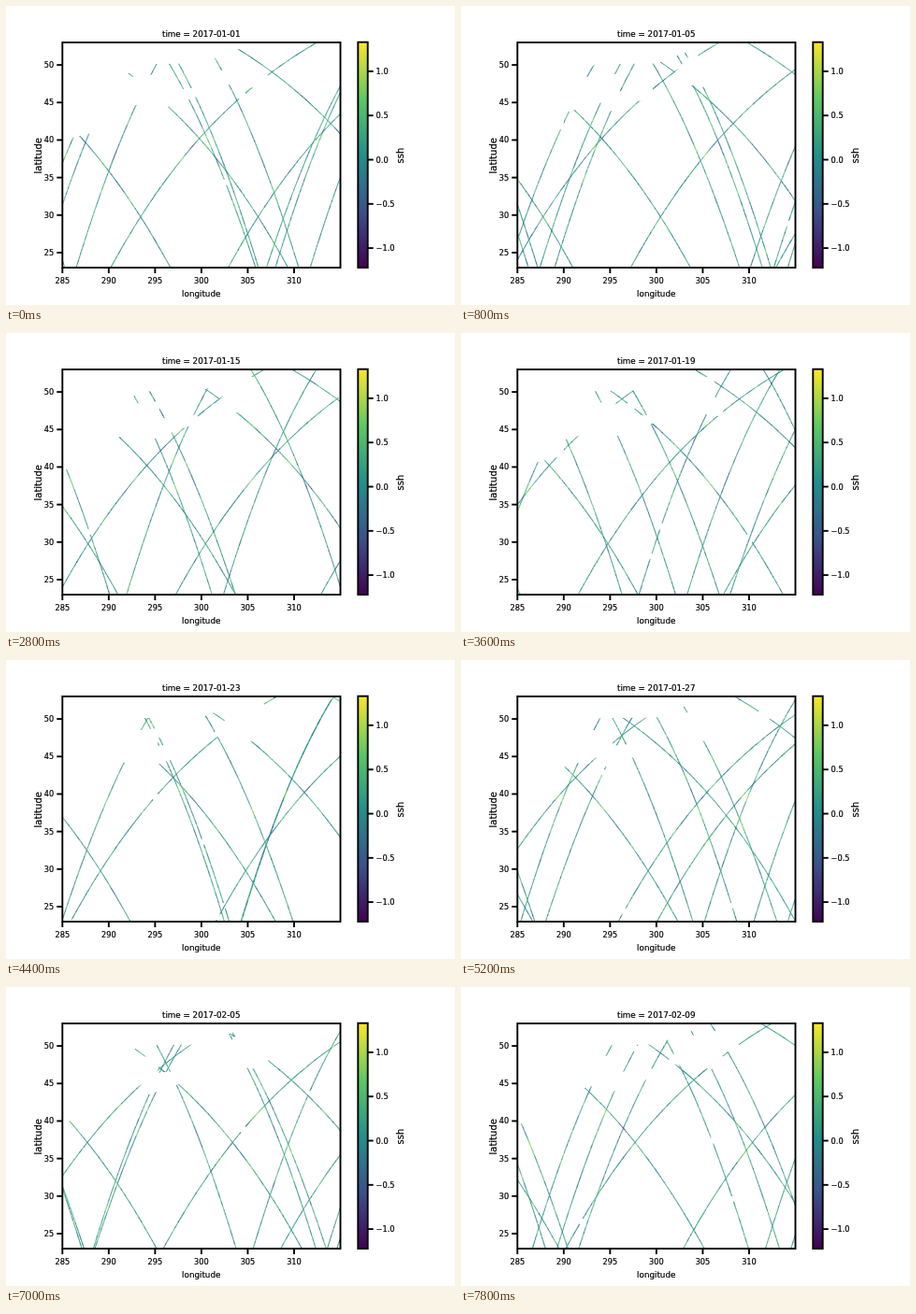
An HTML page with a canvas for the animation above (8 s loop, 480 by 320 pixels).

```html
<!DOCTYPE html>
<html lang="en">
<head>
<meta charset="utf-8">
<title>Sea surface height along satellite tracks</title>
<style>
  html, body { margin: 0; width: 100%; height: 100%; overflow: hidden; background: #fff; }
  canvas, svg { position: absolute; left: 0; top: 0; width: 480px; height: 320px; }
  text { font-family: "DejaVu Sans", sans-serif; fill: #000; stroke: #000; stroke-width: .2px; }
</style>
</head>
<body>
<canvas id="plot" width="480" height="320"></canvas>
<svg id="labels" viewBox="0 0 480 320"></svg>
<script>
const ctx = document.getElementById('plot').getContext('2d');
const svg = document.getElementById('labels');
const DAYS = 40, STEP = 200, RAD = Math.PI / 180;
const BOX = { l: 60.3, r: 357.5, t: 39, b: 280 };
const BAR = { l: 376.3, r: 386.7, t: 38.7, b: 280 };
const px = lon => BOX.l + (lon - 285) * 9.907;
const py = lat => BOX.b - (lat - 23) * 8.033;
const barY = v => 164.5 - v * 94.6;
const mod = (a, n) => ((a % n) + n) % n;
const hash = (a, b, c) => mod(Math.sin(a * 12.99 + b * 78.23 + c * 37.72) * 43758.55, 1);

// Height colours, evenly spaced from low to high
const RAMP = ['#440154', '#3b528b', '#21918c', '#5ec962', '#fde725'];
const channel = (hex, i) => parseInt(hex.slice(1 + 2 * i, 3 + 2 * i), 16);
function colour(v) {
  const k = Math.min(.999, Math.max(0, (BAR.b - barY(v)) / (BAR.b - BAR.t))) * (RAMP.length - 1);
  const i = Math.floor(k);
  const mix = c => channel(RAMP[i], c) * (1 - k + i) + channel(RAMP[i + 1], c) * (k - i);
  return `rgb(${[0, 1, 2].map(c => Math.round(mix(c)))})`;
}

// Rough coasts as lon, lat pairs: the mainland with its gulf, and the island
const COASTS = [
  [284,38, 286,40.3, 290,41.5, 290,43.6, 294,45, 294.3,43.5, 300,46, 299.5,47, 295.2,46.4,
   295.7,48.8, 291.5,48.3, 293.4,50.1, 300,50.2, 304.2,52.2, 304.4,54, 284,54],
  [301,47.7, 307.2,46.7, 307.2,48.6, 303.8,51.5]
];

// Sun-synchronous orbits: lon at 23N on day 0 for tracks leaning right and left,
// and degrees between passes
const POLAR = [
  { incl: 99.34, right: 307.02, left: 305.86, gap: 26.1253, outages: [14, 22] },
  { incl: 98.65, right: 311.74, left: 310.5, gap: 25.2468, outages: [] },
  { incl: 98.54, right: 307.98, left: 306.15, gap: 25.1545, outages: [] }
];
// Inclined orbits: day and lon of one northbound pass at 23N
const INCLINED = [{ t: 26.052, lon: 280.21 }, { t: 14.141, lon: 284.54 }];
const REV = 9.9156 / 127, REV_GAP = 3600 / 127;

// Longitude gained since the equator, on a flattened earth
function reach(incl, gap, lat) {
  const centric = Math.atan(.99331 * Math.tan(lat * RAD));
  const s = Math.sin(centric) / Math.sin(incl * RAD), u = Math.asin(s);
  return Math.atan2(Math.cos(incl * RAD) * s, Math.cos(u)) / RAD - gap / 360 * u / RAD;
}

function track(day, incl, gap, lon23, dir) {
  const start = reach(incl, gap, 23), d = .25, seed = lon23 + dir * 7;
  const at = lat => lon23 + dir * (reach(incl, gap, lat) - start);
  for (let lat = 22.75; lat < 53.25; lat += d) {
    const lon = at(lat), next = at(lat + d);
    if (Math.max(lon, next) < 284.8 || Math.min(lon, next) > 315.2) continue;
    if (hash(day, seed, Math.floor(lat * 1.3)) < .008) continue;
    const swell = Math.sin(lon * 1.1 + lat * .8) * Math.sin(lat * .9 - lon * .5 + day * .05);
    const stream = Math.exp(-(((lat - 38.5) / 4) ** 2));
    const noise = hash(day + 3, seed, lat) - .5;
    ctx.strokeStyle = colour(.12 + swell * (.2 + .3 * stream) + noise * .8);
    ctx.globalAlpha = .7 + .3 * hash(seed, lat, 1);
    line(px(lon), py(lat), px(next), py(lat + d));
  }
  ctx.globalAlpha = 1;
}

function polarTracks(day) {
  for (const s of POLAR) for (const [base, dir] of [[s.right, -1], [s.left, 1]]) {
    const drift = 360 - 14 * s.gap;
    for (let lon = 268 + mod(base + drift * day - 268, s.gap); lon < 330; lon += s.gap) {
      const lost = dir < 0 && lon > 300 && s.outages.includes(day);
      if (!lost) track(day, s.incl, s.gap, lon, dir);
    }
  }
}

function inclinedTracks(day) {
  for (const s of INCLINED) for (const [dt, dLon, dir] of [[0, 0, 1], [.028, 148.19, -1]]) {
    const t0 = s.t + dt;
    for (let n = Math.ceil((day - t0) / REV); t0 + n * REV < day + 1; n++) {
      const lon = mod(s.lon + dLon - n * REV_GAP, 360);
      if (lon > 255 && lon < 340) track(day, 66.04, REV_GAP, lon, dir);
    }
  }
}

function fillArea(points) {
  ctx.beginPath();
  for (let i = 0; i < points.length; i += 2) ctx.lineTo(px(points[i]), py(points[i + 1]));
  ctx.fill();
}

// Land and the slowly spreading sea ice carry no data
function hideLand(day) {
  const edge = 304 + day * .125;
  ctx.fillStyle = '#fff';
  COASTS.forEach(fillArea);
  fillArea([304, 49.2, edge, 49.2, edge, 52, 304, 52]);
}

function line(x1, y1, x2, y2) {
  ctx.beginPath();
  ctx.moveTo(x1, y1);
  ctx.lineTo(x2, y2);
  ctx.stroke();
}

const rectOf = b => [b.l, b.t, b.r - b.l, b.b - b.t];

function axes() {
  const g = ctx.createLinearGradient(0, BAR.b, 0, BAR.t);
  RAMP.forEach((c, i) => g.addColorStop(i / (RAMP.length - 1), c));
  ctx.fillStyle = g;
  ctx.fillRect(...rectOf(BAR));

  ctx.strokeStyle = '#000';
  ctx.lineWidth = 1.9;
  ctx.strokeRect(...rectOf(BOX));
  ctx.strokeRect(...rectOf(BAR));
  for (let lon = 285; lon < 315; lon += 5) line(px(lon), BOX.b, px(lon), BOX.b + 6);
  for (let lat = 25; lat <= 50; lat += 5) line(BOX.l - 6, py(lat), BOX.l, py(lat));
  for (let v = -1; v <= 1; v += .5) line(BAR.r, barY(v), BAR.r + 6, barY(v));
}

function label(str, x, y, size, anchor = 'middle', turn = 0) {
  const el = document.createElementNS('http://www.w3.org/2000/svg', 'text');
  el.textContent = str;
  el.setAttribute('font-size', size);
  el.setAttribute('text-anchor', anchor);
  el.setAttribute('transform', `translate(${x} ${y}) rotate(${turn})`);
  svg.appendChild(el);
  return el;
}

const title = label('', 208.7, 33.2, 8.75);
label('longitude', 208.7, 310.8, 8.75);
label('latitude', 37.6, 160.3, 10, 'middle', -90);
label('ssh', 425, 160, 10, 'middle', -90);
for (let lon = 285; lon < 315; lon += 5) label(lon, px(lon), 297.4, 8.2);
for (let lat = 25; lat <= 50; lat += 5) label(lat, 51.2, py(lat) + 3, 8.2, 'end');
for (let v = -1; v <= 1; v += .5) {
  label(v.toFixed(1).replace('-', '\u2212'), 395.6, barY(v) + 3, 8.2, 'start');
}

function draw(day) {
  ctx.fillStyle = '#fff';
  ctx.fillRect(0, 0, 480, 320);
  ctx.save();
  ctx.beginPath();
  ctx.rect(...rectOf(BOX));
  ctx.clip();
  ctx.lineWidth = 1.1;
  polarTracks(day);
  inclinedTracks(day);
  hideLand(day);
  ctx.restore();
  axes();
  title.textContent = 'time = ' + new Date(Date.UTC(2017, 0, 1 + day)).toISOString().slice(0, 10);
}

let shown = -1;
function tick() {
  const day = Math.floor(performance.now() / STEP) % DAYS;
  if (day !== shown) draw(shown = day);
  requestAnimationFrame(tick);
}
tick();
</script>
</body>
</html>
```
